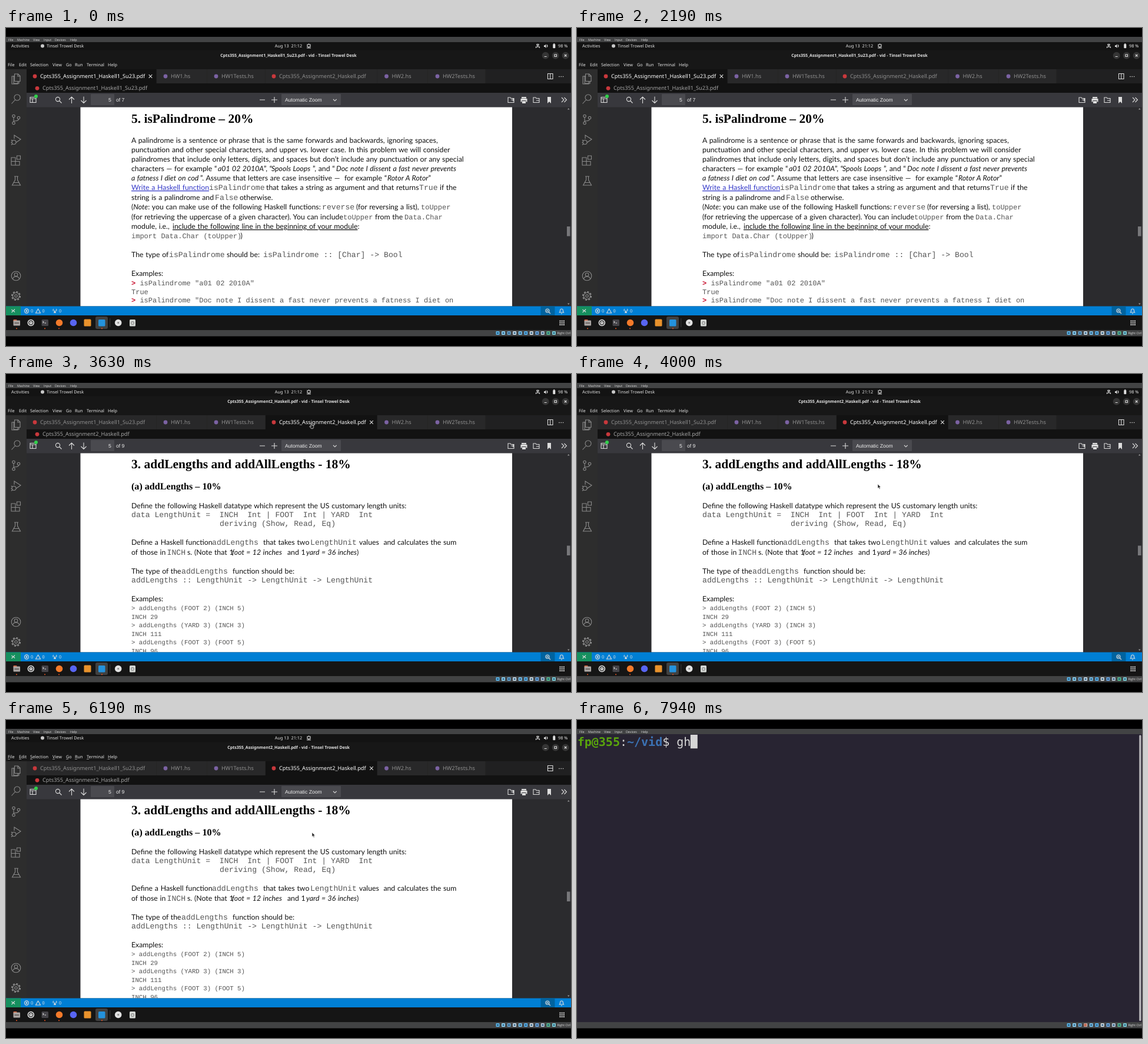
These frames come from a looping animation (960 by 540 pixels, 8 s). An HTML page:

```html
<!DOCTYPE html>
<html lang="en">
<head>
<meta charset="utf-8">
<title>Screen recording</title>
<style>
html, body { margin: 0; width: 100%; height: 100%; overflow: hidden; background: #000; }
svg { display: block; width: 100vw; height: 100vh; }
text { white-space: pre; text-rendering: geometricPrecision; }
.ui { font: 7.3px "Noto Sans", "Open Sans", sans-serif; fill: #e4e4e4; }
.vm { font: 5.3px "Open Sans", "Noto Sans", sans-serif; fill: #e0e0e0; }
.tab { font-size: 9.2px; }
.bold { font-weight: 700; }
.mid { text-anchor: middle; }
.pdf { font: 8.65px "Liberation Sans", sans-serif; fill: #eee; }
.body { font: 12.3px Lato, sans-serif; word-spacing: .6px; fill: #111; }
.h1, .h2 { font: 700 21.5px "Liberation Serif", serif; fill: #000; }
.h2 { font-size: 16.13px; }
.code, .code12, .code10 { font: 13.15px "Liberation Mono", monospace; word-spacing: 0; fill: #555; }
.code12 { font-size: 12px; }
.code10 { font-size: 10.72px; }
.prompt { fill: #c8102e; font-weight: 700; }
.term { font: 20px "DejaVu Sans Mono", monospace; fill: #d6d6d6; }
.link { fill: #3338c8; text-decoration: underline; }
.u { text-decoration: underline; }
i { font-style: italic; }
.it { font-style: italic; }
.line { fill: none; stroke: #8a8a8a; stroke-width: 1.1; }
.light { stroke: #dcdcdc; }
</style>
</head>
<body>
<svg id="stage" viewBox="0 0 960 540" preserveAspectRatio="none"></svg>
<script>
const APP = 'Tinsel Trowel Desk';
const FILES = ['Cpts355_Assignment1_Haskell1_Su23.pdf', 'Cpts355_Assignment2_Haskell.pdf'];

const rect = (x, y, w, h, fill, rx = 0) =>
  `<rect x="${x}" y="${y}" width="${w}" height="${h}" fill="${fill}" rx="${rx}"/>`;
const dot = (x, y, r, fill) => `<circle cx="${x}" cy="${y}" r="${r}" fill="${fill}"/>`;
const path = (d, cls = '') => `<path class="line ${cls}" d="${d}"/>`;
const ring = (x, y, r, cls = '') => `<circle class="line ${cls}" cx="${x}" cy="${y}" r="${r}"/>`;
const text = (x, y, cls, s) => `<text x="${x}" y="${y}" class="${cls}">${s}</text>`;
const span = (cls, s, x) => `<tspan class="${cls}"${x ? ` x="${x}"` : ''}>${s}</tspan>`;
const group = (id, s) => `<g id="${id}">${s}</g>`;
const para = (y, s) => text(213, y, 'body', s);
const cross = (x, y, r = 2.8) => path(`M${x - r} ${y - r}l${2 * r} ${2 * r}m0 ${-2 * r}l${-2 * r} ${2 * r}`, 'light');

function machineFrame() {
  const menu = [[4, 'File'], [19, 'Machine'], [46, 'View'], [64, 'Input'], [83, 'Devices'], [109, 'Help']];
  const colors = ['#5cb8ec', '#8fd4f4', '#69a5cf', '#c9dcea', '#7cc4ee', '#5ab4f0', '#d5dde2', '#6fa9e4', '#b8c8d8', '#58bd8c', '#7ed0d8'];
  return rect(0, 15, 960, 9, '#424344') + rect(0, 513, 960, 10.5, '#424344') +
    menu.map(([x, s]) => text(x, 21.6, 'vm', s)).join('') +
    colors.map((c, i) => rect(832.5 + i * 9.55, 515, 6, 6, c, 1) + rect(834 + i * 9.55, 516.8, 3, 2.4, '#24577c')).join('') +
    `<rect id="netLamp" x="861.3" y="515.5" width="5" height="5" fill="#c46a52"/>` +
    text(936.5, 520.2, 'vm', 'Right Ctrl');
}

function desktopBar() {
  return rect(0, 24, 960, 14, '#131313') + text(9, 33.2, 'ui', 'Activities') +
    dot(62, 30.5, 3, '#c8c8c8') + text(69, 33.2, 'ui', APP) +
    text(480, 33.2, 'ui mid', 'Aug 13  21:12') +
    path('M512 28h5v4h-5zM514.5 26.5v1.5M514.5 32v2M511 34h7', 'light') +
    path('M902 27.5h3v2h-3zM903.5 30v2M900.5 34v-2h6v2', 'light') +
    `<path d="M914 29.5h1.5l2-2v6.5l-2-2H914z" fill="#ddd"/>` + path('M919 28.5q2 2 0 4', 'light') +
    rect(929.3, 27.3, 4, 7, '#e2e2e2', .7) + rect(930.3, 26.3, 2, 1, '#e2e2e2') +
    text(938, 33.2, 'ui', '98 %');
}

function activityBar() {
  return rect(0, 70, 35, 403, '#2d2d2d') +
    path('M13 81v13h9v-3M14.500 78h6l3.500 3.500v9h-9.500zM20 78v4h4M14 82h-4v13h10v-4') +
    ring(19, 118, 5) + path('M15.500 122l-6 6.500') +
    ring(13, 149.5, 2.200) + ring(13, 161.500, 2.200) + ring(21.500, 152.500, 2.200) + path('M13 152v7M21.500 155q0 3-8.500 3') +
    path('M14 188v-6l11 7-8 5.500') + ring(13.500, 194, 3.500) + path('M9 190l2 2M8.500 194.500h1.500M9 198.500l2-2') +
    path('M9 220h7v13H9zM9 226.500h14V233H9M18.500 217h6v6h-6z') +
    path('M14 252h7M15.500 252v6l-5 9h14l-5-9v-6M13 262.500h9') +
    ring(17, 421, 7.800) + ring(17, 418.800, 2.800) + path('M11.500 426q1-4 5.500-4t5.500 4') +
    `<circle class="line" cx="17" cy="455" r="7" stroke-dasharray="3 2.500" style="stroke-width:2.200"/>` +
    ring(17, 455, 5.500) + ring(17, 455, 2.200);
}

function pdfToolbar(pages) {
  return rect(35, 110, 925, 24.500, '#38383d') +
    path('M41 117.500h10v9H41zM41 120h10M45 120v6', 'light') + dot(51, 116, 3, '#30d04a') +
    ring(88, 121, 3.600, 'light') + path('M90.500 123.500l4 4', 'light') +
    path('M111.500 128v-11M107 121.500l4.500-4.500 4.500 4.500M132 116.500v11M127.500 123l4.500 4.500 4.500-4.500', 'light') +
    rect(144, 112, 40, 19, '#4a4a4f', 1) + text(174, 125, 'pdf', '5') + text(187, 125, 'pdf', 'of ' + pages) +
    path('M431 122h9M451 122h10M456 117v10', 'light') +
    rect(468, 112, 101, 19, '#4a4a4f', 1) + text(474, 125, 'pdf', 'Automatic Zoom') +
    path('M556 121l2.800 2.800 2.800-2.800', 'light') +
    path('M853 118h4l1 1.500h5v7h-10zM858 122h5m-2-2l2 2-2 2M896 118h4l1 1.500h5v7h-10zM901 123h5', 'light') +
    `<path d="M876 117h8v2.500h-8zM874.500 120h11v5.500h-2V123h-7v2.500h-2zM877 124h6v4h-6zM920 117h6v11l-3-3-3 3z" fill="#ddd"/>` +
    path('M944 118l4 4-4 4M948.500 118l4 4-4 4', 'light');
}

function tabs(active) {
  const list = [[35, 221, 58, FILES[0]], [256, 86, 280, 'HW1.hs'], [342, 99, 366, 'HW1Tests.hs'],
    [441, 190, 464, FILES[1]], [631, 86, 655.5, 'HW2.hs'], [717, 98, 742, 'HW2Tests.hs']];
  const icon = (x, y, name) => dot(x, y, 3.4, name.endsWith('pdf') ? '#c8383c' : '#7b62a3');
  const file = FILES[active];
  return rect(35, 70, 925, 24, '#202021') + list.map(([x, w, tx, name]) => {
    const on = name === file;
    return rect(x, 70, w - .5, 24, on ? '#121212' : '#282829') + icon(tx - 9, 82, name) +
      `<text x="${tx}" y="85.2" class="ui tab" style="fill:${on ? '#fff' : '#8e8e8e'}">${name}</text>`;
  }).join('') + cross(active ? 621 : 245.5, 82) +
    rect(35, 94, 925, 16, '#121212') + icon(53, 102.3, file) +
    `<text x="62" y="105.4" class="ui tab" style="fill:#a4a4a4">${file}</text>`;
}

const palindromePage = () =>
  text(213, 160.8, 'h1', '5. isPalindrome – 20%') +
  para(194.5, 'A palindrome is a sentence or phrase that is the same forwards and backwards, ignoring spaces,') +
  para(210.6, 'punctuation and other special characters, and upper vs. lower case. In this problem we will consider') +
  para(226.7, 'palindromes that include only letters, digits, and spaces but don’t include any punctuation or any special') +
  para(242.8, 'characters — for example “' + span('it', 'a01 02 2010A', 360) + '”, “' + span('it', 'Spools Loops', 451) +
    span('', '”, and “', 521) + span('it', 'Doc note I dissent a fast never prevents', 561)) +
  para(258.9, span('it', 'a fatness I diet on cod') + span('', '”. Assume that letters are case insensitive —  for example “', 330) +
    span('it', 'Rotor A Rotor', 648) + '”') +
  para(275, span('link', 'Write a Haskell function') + span('code', 'isPalindrome', 345) +
    span('', 'that takes a string as argument and that returns', 442) + span('code', 'True', 702) + span('', 'if the', 737)) +
  para(291.5, 'string is a palindrome and' + span('code', 'False', 355) + span('', 'otherwise.', 397)) +
  para(308, '(' + span('it', 'Note') + ': you can make use of the following Haskell functions:' + span('code', 'reverse', 537) +
    span('', '(for reversing a list),', 595) + span('code12', 'toUpper', 705)) +
  para(324.5, '(for retrieving the uppercase of a given character). You can include' + span('code12', 'toUpper', 573) +
    span('', 'from the', 627) + span('code12', 'Data.Char', 677)) +
  para(341, 'module, i.e., ' + `<tspan class="u" x="283">include the following line in the beginning of your module</tspan>:`) +
  text(213, 357, 'code12', 'import Data.Char (toUpper)') + text(398.5, 357, 'body', ')') +
  para(389, 'The type of' + span('code', 'isPalindrome', 277) + span('', 'should be:', 375) +
    span('code', 'isPalindrome :: [Char] -&gt; Bool', 437)) +
  para(421, 'Examples:') +
  text(213, 436.5, 'code12', span('prompt', '&gt;') + ' isPalindrome "a01 02 2010A"') +
  text(213, 451.5, 'code12', 'True') +
  text(213, 466, 'code12', span('prompt', '&gt;') + ' isPalindrome "Doc note I dissent a fast never prevents a fatness I diet on');

const lengthsPage = () =>
  text(213, 159.5, 'h1', '3. addLengths and addAllLengths - 18%') +
  text(213, 195.6, 'h2', '(a) addLengths – 10%') +
  para(228.3, 'Define the following Haskell datatype which represent the US customary length units:') +
  text(213, 243.2, 'code', 'data LengthUnit =  INCH  Int | FOOT  Int | YARD  Int') +
  text(363, 258, 'code', 'deriving (Show, Read, Eq)') +
  para(290.3, 'Define a Haskell function' + span('code', 'addLengths', 350) + span('', 'that takes two', 437) +
    span('code', 'LengthUnit', 517) + span('', 'values  and calculates the sum', 600)) +
  para(306.6, 'of those in' + span('code', 'INCH', 273.5) + span('', 's. (Note that 1 ', 308) +
    span('it', 'foot = 12 inches', 384) + span('', 'and 1', 478) + span('it', 'yard = 36 inches', 510) + ')') +
  para(339, 'The type of the' + span('code', 'addLengths', 298) + span('', 'function should be:', 385)) +
  text(213, 354.2, 'code', 'addLengths :: LengthUnit -&gt; LengthUnit -&gt; LengthUnit') +
  para(385.5, 'Examples:') +
  ['&gt; addLengths (FOOT 2) (INCH 5)', 'INCH 29', '&gt; addLengths (YARD 3) (INCH 3)', 'INCH 111',
    '&gt; addLengths (FOOT 3) (FOOT 5)', 'INCH 96'].map((s, i) => text(213, 401 + i * 14.6, 'code10', s)).join('');

const documentView = (i, pages, page, thumbY) => group('doc' + i,
  tabs(i) + pdfToolbar(pages) + rect(126.5, 134.5, 733.5, 338, '#fff') +
  `<g clip-path="url(#pageClip)">${page}</g>` + rect(953, thumbY, 5.5, 16.5, '#77777a'));

function statusBar() {
  return rect(0, 472.5, 960, 15.5, '#007fd4') + rect(0, 472.5, 25, 15.5, '#16905f') +
    path('M9.500 478l2.500 2.500-2.500 2.500M15 477.500l-2.500 2.500 2.500 2.500', 'light') +
    ring(35, 480.500, 3.600, 'light') + path('M33.500 479l3 3m0-3l-3 3M54.500 477l4 7h-8z', 'light') +
    text(42, 483.4, 'ui', '0') + text(61.5, 483.4, 'ui', '0') + text(90, 483.4, 'ui', '0') +
    path('M83 480v4M81.500 484l1.500-4 1.500 4M80.500 477q-1 2 0 4M85.500 477q1 2 0 4', 'light') +
    rect(908.5, 472.5, 24, 15.5, '#00639f') + ring(920, 480, 3, 'light') + path('M922 482l3 3M918.500 480h3M920 478.500v3', 'light') +
    path('M940.500 483q1-1 1-3 0-3 2.500-3t2.500 3q0 2 1 3zM943 485h2', 'light');
}

function dock() {
  let grid = '';
  for (let i = 0; i < 9; i++) grid += rect(940.5 + i % 3 * 3.2, 496.5 + Math.floor(i / 3) * 3.2, 2, 2, '#e0e0e0');
  return rect(0, 488, 960, 25, '#151515') + rect(152, 490, 21, 21, '#404040', 3) +
    rect(12.5, 495, 6, 4, '#d9623b', 1) + rect(12.5, 496.5, 11.5, 9, '#a9a4a2', 1) + rect(14.5, 500, 7.5, 2, '#6b6563') +
    dot(42.3, 500.5, 5.8, '#dedede') + dot(42.3, 500.5, 4.2, '#3c3c3c') + dot(42.3, 500.5, 2.6, '#e8e8e8') + dot(42.3, 500.5, 1, '#444') +
    rect(60.5, 495, 11.5, 11, '#454449', 1.5) + path('M62.500 498l1.500 1.500-1.500 1.500M65.500 501h2.500', 'light') +
    dot(90.5, 500.5, 5.8, '#f47a2a') + dot(114.5, 500.5, 5.8, '#5865f2') +
    rect(132.5, 494.5, 12, 12, '#e8922c', 1.5) + rect(157, 495, 11.5, 11.5, '#2492dc', 1.5) +
    rect(176.5, 493, .7, 15, '#4a4a4a') + dot(190.7, 500.5, 5.8, '#e2e2e2') + dot(190.7, 500.5, 1.5, '#888') +
    rect(210, 495, 10, 11.5, '#d5d8d5', 1.5) + ring(215, 501, 2.4) +
    [18, 66, 90, 163].map(x => dot(x, 510.3, 1, '#e95420')).join('') + grid;
}

function desktop() {
  const menu = [[3, 'File'], [22, 'Edit'], [41, 'Selection'], [79, 'View'], [102, 'Go'], [117, 'Run'], [137, 'Terminal'], [173, 'Help']];
  return desktopBar() + rect(0, 38, 960, 32, '#171717') +
    `<text id="title" x="480" y="49.4" class="ui bold mid" style="font-size:7.1px"></text>` +
    [916.7, 933.7, 950.7].map(x => dot(x, 46.7, 6, '#353535')).join('') +
    path('M914.700 48.500h4M932 45h3.500v3.500H932z', 'light') + cross(950.7, 46.7, 1.8) +
    menu.map(([x, s]) => text(x, 65.4, 'ui', s)).join('') +
    group('mnemonics', menu.map(([x]) => rect(x, 66.2, 4, .6, '#ddd')).join('')) +
    rect(35, 134, 925, 339, '#2b2b2e') +
    documentView(0, 7, palindromePage(), 337) + documentView(1, 9, lengthsPage(), 291.5) +
    group('hoverClose', cross(621, 82)) +
    path('M920.500 77.500h8.500v9h-8.500z', 'light') +
    `<path id="split" class="line light" d=""/>` +
    [940, 943.3, 946.6].map(x => dot(x, 82.5, .8, '#ddd')).join('') +
    `<path d="M955.800 136l1.800 2.400h-3.600zM955.800 470l1.800-2.400h-3.600z" fill="#999"/>` +
    activityBar() + statusBar() + dock() +
    group('arrow', `<path d="M0 0v7.200l1.700-1.500 1.200 2.700 1.200-.6-1.200-2.500h2.300z" fill="#222" stroke="#eee" stroke-width=".6"/>`) +
    group('hand', `<path d="M0 0q1-.8 1.500.2v3l3.200 1v3l-1 2H.5l-2.800-3.700q.5-1 1.400-.3l.9.900z" fill="#222" stroke="#eee" stroke-width=".7"/>`);
}

function terminal() {
  return rect(0, 24, 960, 489, '#282432') + rect(955.3, 25.5, 3.2, 485.5, '#bdbcbf', 1.5) +
    text(.7, 43.5, 'term', `<tspan class="bold" fill="#5aa60c">fp@355</tspan>:<tspan class="bold" fill="#3b72b4">~/vid</tspan>$ <tspan id="typed"></tspan>`) +
    `<rect id="caret" y="25" width="12" height="23.3" fill="#d6d6d6"/>` +
    group('beam', path('M518 187.500h3.400M519.700 187.500v7M518 194.500h3.400', 'light'));
}

document.getElementById('stage').innerHTML =
  `<clipPath id="pageClip"><rect x="126.5" y="134.5" width="733.5" height="338"/></clipPath>` +
  rect(0, 0, 960, 540, '#000') + group('desktop', desktop()) + group('terminal', terminal()) + machineFrame();

const byId = id => document.getElementById(id);
const show = (id, on) => byId(id).style.display = on ? '' : 'none';

// Pointer stops: time, x, y
const POINTER = [[2880, 500, 300], [3380, 518, 83], [3620, 518, 83], [3900, 511, 187], [4380, 511, 187], [4630, 520, 191]];
function pointerAt(t) {
  const next = POINTER.findIndex(p => p[0] > t);
  if (next < 0) return POINTER.at(-1).slice(1);
  if (next === 0) return null;
  const [t0, x0, y0] = POINTER[next - 1], [t1, x1, y1] = POINTER[next];
  const k = (t - t0) / (t1 - t0), e = k * k * (3 - 2 * k);
  return [x0 + (x1 - x0) * e, y0 + (y1 - y0) * e];
}

function draw(t) {
  const inTerminal = t >= 6440, second = t >= 3620, altHeld = t >= 6190;
  show('desktop', !inTerminal);
  show('terminal', inTerminal);
  show('doc0', !second);
  show('doc1', second);
  byId('title').textContent = `${FILES[t >= 3560 ? 1 : 0]} - vid - ${APP}`;
  show('mnemonics', altHeld);
  byId('split').setAttribute('d', altHeld ? 'M920.5 82h8.5' : 'M924.75 77.500v9');

  const pointer = pointerAt(t), onTab = !!pointer && pointer[1] < 94;
  show('arrow', pointer && !onTab);
  show('hand', onTab);
  show('hoverClose', onTab && !second);
  if (pointer) byId(onTab ? 'hand' : 'arrow').setAttribute('transform', `translate(${pointer})`);

  const typed = 'gh'.slice(0, (t >= 7630) + (t >= 7820));
  byId('typed').textContent = typed;
  byId('caret').setAttribute('x', 168.7 + typed.length * 12.04);
  show('beam', !typed);
  show('netLamp', t >= 7880);
}

function tick() {
  draw(performance.now() % 8000);
  requestAnimationFrame(tick);
}
tick();
</script>
</body>
</html>
```
